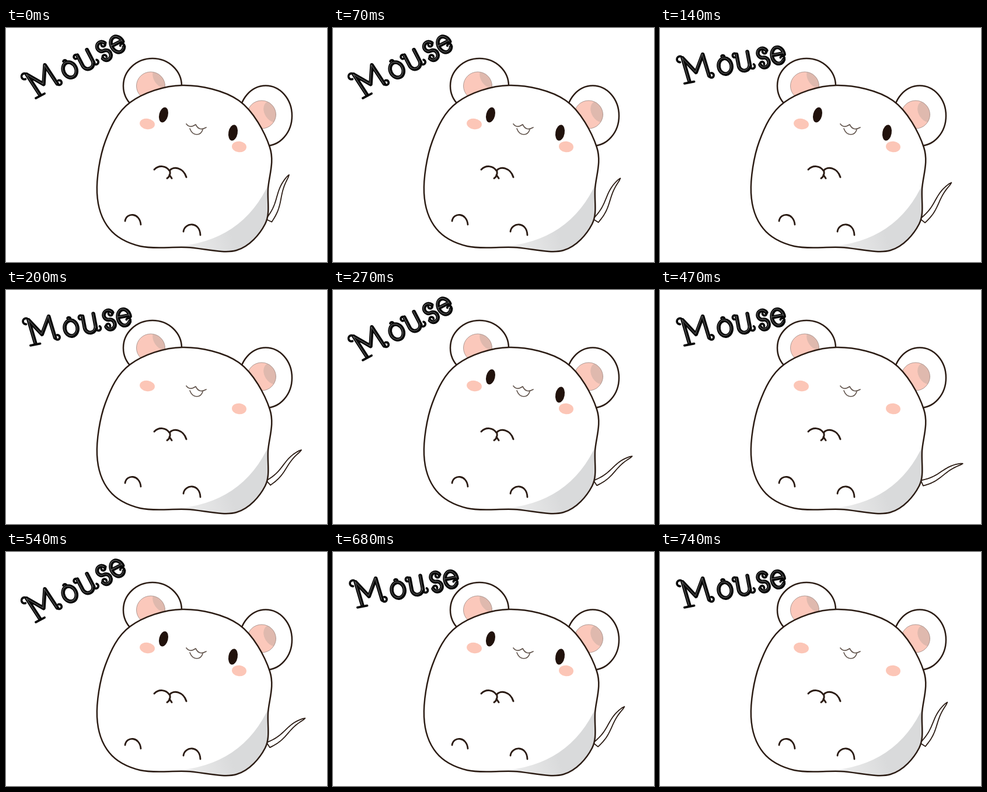
An HTML page with a canvas for the animation above (0.81 s loop, 550 by 400 pixels).

```html
<!DOCTYPE html>
<html lang="en">
<head>
<meta charset="utf-8">
<title>Mouse</title>
<style>
  html, body { margin: 0; width: 100%; height: 100%; overflow: hidden; background: #fff; }
  canvas { display: block; }
</style>
</head>
<body>
<canvas id="stage" width="550" height="400" role="img" aria-label="Mouse"></canvas>
<script>
const ctx = document.getElementById('stage').getContext('2d');
const INK = '#2b1c14';
const LOOP = 810, BEAT = 270;
const TAIL_CHANGES = [70, 140, 200];
const { PI } = Math;

function stroke(path, width, color = INK) {
  ctx.lineWidth = width;
  ctx.strokeStyle = color;
  ctx.stroke(path);
}

function fill(path, color) {
  ctx.fillStyle = color;
  ctx.fill(path);
}

function ellipse(x, y, rx, ry, turn = 0) {
  const path = new Path2D();
  path.ellipse(x, y, rx, ry, turn, 0, PI * 2);
  return path;
}

function clipped(region, draw) {
  ctx.save();
  ctx.clip(region);
  draw();
  ctx.restore();
}

// Closed smooth curve through a few points (Catmull-Rom).
function blob(points) {
  const path = new Path2D();
  const at = i => points[(i + points.length) % points.length];
  path.moveTo(...points[0]);
  points.forEach((b, i) => {
    const a = at(i - 1), c = at(i + 1), d = at(i + 2);
    path.bezierCurveTo(b[0] + (c[0] - a[0]) / 6, b[1] + (c[1] - a[1]) / 6,
      c[0] - (d[0] - b[0]) / 6, c[1] - (d[1] - b[1]) / 6, ...c);
  });
  path.closePath();
  return path;
}

const body = blob([[302, 98], [399, 124], [452, 204], [449, 275], [444, 335], [395, 380],
  [310, 375], [230, 373], [177, 343], [156, 282], [170, 194], [213, 127]]);
const shade = new Path2D('M452 262 Q406 367 285 374 V400 H470 Z');
const mouth = new Path2D('M309 164 Q315 172 325 165 Q331 177 343 170 M315 172 C320 185 333 185 337 174');
const hands = new Path2D('M254 242 C262 234 274 235 280 244 C287 235 304 239 309 255 M281 245 Q282 253 276 257 M280 251 L284 257');
const feet = new Path2D('M204 330 C206 315 229 315 231 336 M304 348 C306 332 332 330 333 354');

function drawTail(pose) {
  const baseX = 448, baseY = 328;
  const dx = 485 + 15 * pose - 0.6 * pose ** 2 - baseX;
  const dy = 251 + 10 * pose + 3.3 * pose ** 2 - baseY;
  const tail = new Path2D();
  const edge = (u, side) => {
    const bend = 0.03 * (Math.sin(2 * PI * u) + 1 - u);
    const v = bend + side * 0.065 * Math.sqrt(1 - u);
    tail.lineTo(baseX + u * dx - v * dy, baseY + u * dy + v * dx);
  };
  for (let i = 0; i <= 20; i++) edge(i / 20, -1);
  for (let i = 20; i >= 0; i--) edge(i / 20, 1);
  tail.closePath();
  fill(tail, '#fff');
  stroke(tail, 1.8);
}

function drawEar(x, y, rx, ry, innerX, innerY, shadowX, shadowY) {
  const rim = ellipse(x, y, rx, ry);
  const inner = ellipse(innerX, innerY, 24.5, 24);
  fill(rim, '#fff');
  fill(inner, '#fbc8bb');
  clipped(inner, () => fill(ellipse(shadowX, shadowY, 15, 20, -0.6), '#dfb9ae'));
  stroke(inner, 0.9, '#a8958f');
  stroke(rim, 2.5);
}

function drawBody() {
  fill(body, '#fff');
  clipped(body, () => {
    const grey = ctx.createLinearGradient(300, 374, 440, 325);
    grey.addColorStop(0, '#eeeeee');
    grey.addColorStop(0.6, '#d9dadb');
    fill(shade, grey);
  });
  stroke(body, 2.5);
}

function drawFace(eyesOpen) {
  fill(ellipse(242, 164, 13, 9, 0.15), '#fcc6b7');
  fill(ellipse(399.5, 203, 12.5, 9.3, 0.1), '#fcc6b7');
  if (eyesOpen) {
    fill(ellipse(270, 148.5, 7.6, 13.2, 0.24), '#21120c');
    fill(ellipse(389, 179, 7.8, 13.6, 0.18), '#21120c');
  }
  stroke(mouth, 1.7, '#655850');
  stroke(hands, 3);
  stroke(feet, 2.8);
}

// Lettering: bold stems and bowls, finished with round curls.
const bold = new Path2D(), curls = new Path2D();

function bowl(x, y, rx, ry, from, to, back = false) {
  bold.moveTo(x + rx * Math.cos(from), y + ry * Math.sin(from));
  bold.ellipse(x, y, rx, ry, 0, from, to, back);
}

function curl(x, y, r, from, sweep) {
  curls.moveTo(x + r * Math.cos(from), y + r * Math.sin(from));
  curls.arc(x, y, r, from, from + sweep, sweep < 0);
}

function buildTitle() {
  // M
  bold.addPath(new Path2D('M1 -44 L5 -3 M1 -44 L19 -16 L36 -44 L40 -6'));
  curls.addPath(new Path2D('M-4 -1 H13'));
  curl(-4, -43, 5, 0, -4.6);
  curl(44, -6, 4, PI, -4.6);
  // o
  bowl(70, -17, 11, 13.5, 0, 2 * PI);
  curl(69, -33, 3, PI / 2, -4);
  // u
  bold.addPath(new Path2D('M93 -33 V-13 M112 -34 V-9'));
  bowl(102.5, -13, 9.5, 10, PI, 0, true);
  curl(89.5, -32, 3.5, 0, -4.4);
  curl(116, -8, 4, PI, -4);
  // s
  bowl(137, -27, 8, 8, -0.4, PI / 2, true);
  bowl(137, -10.5, 8, 8.5, -PI / 2, PI * 0.9);
  curl(141, -29, 3.5, 0, 3.6);
  curl(133, -9, 3.5, PI, 3.6);
  // e
  bold.addPath(new Path2D('M152 -20 H173'));
  bowl(162.5, -18, 10.5, 14, 0, 0.7, true);
  curl(169, -12, 3.5, 0.9, -3.6);
}

function drawTitle(tilted) {
  ctx.save();
  ctx.translate(...(tilted ? [55, 119] : [46, 95]));
  ctx.rotate((tilted ? -27.5 : -10.8) * PI / 180);
  stroke(curls, 3.8, '#080808');
  stroke(bold, 6.6, '#080808');
  ctx.translate(-0.8, -0.8);
  stroke(bold, 0.9, '#707070');
  ctx.restore();
}

function draw(now) {
  const time = now % LOOP, beatTime = time % BEAT;
  const step = Math.floor(time / BEAT) * 4 + TAIL_CHANGES.filter(t => beatTime >= t).length;
  ctx.fillStyle = '#fff';
  ctx.fillRect(0, 0, 550, 400);
  ctx.lineCap = ctx.lineJoin = 'round';
  drawTail((6 - Math.abs(6 - step)) / 2);
  drawEar(251, 99, 50, 47, 248, 99, 268, 84);
  drawEar(445, 150, 45, 51.5, 438, 148, 458, 143);
  drawBody();
  drawFace(beatTime < 170);
  drawTitle(beatTime < 140);
}

let start;
function tick(now) {
  start ??= now;
  draw(now - start);
  requestAnimationFrame(tick);
}
buildTitle();
draw(0);
requestAnimationFrame(tick);
</script>
</body>
</html>
```
